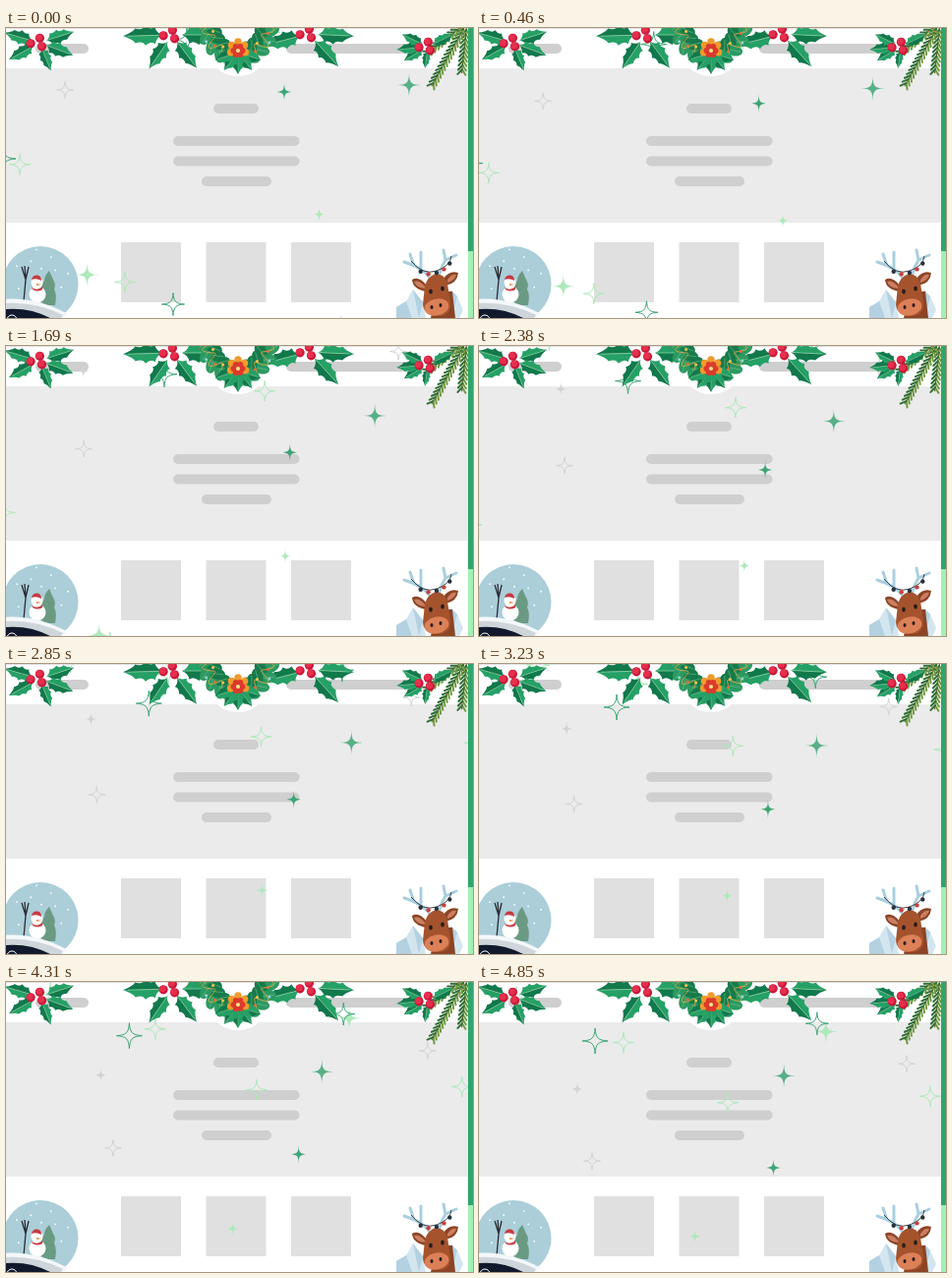
An HTML page that plays this animation: 475 by 295 pixels, repeating every 4.92 s.

```html
<!DOCTYPE html>
<html lang="en">
<head>
<meta charset="utf-8">
<title>Festive page</title>
<style>
  html, body { margin: 0; width: 100%; height: 100%; overflow: hidden; background: #fff; }
  svg { display: block; width: 475px; height: 295px; }
</style>
</head>
<body>
<svg id="stage" viewBox="0 0 475 295" xmlns="http://www.w3.org/2000/svg">
  <defs>
    <g id="leaf">
      <path fill="#25a066" d="M0 0Q5-2 6-7Q9-4 14-8Q16-4 22-6Q24-3 32 0Z"/>
      <path fill="#11794c" d="M0 0Q5 2 6 7Q9 4 14 8Q16 4 22 6Q24 3 32 0Z"/>
      <path stroke="#8fd3a4" stroke-width=".6" d="M1 0H28"/>
    </g>
    <g id="berry">
      <circle r="4.600" fill="#c9183a"/>
      <circle cx="-.8" cy="-.8" r="3.300" fill="#e62f4d"/>
    </g>
  </defs>

  <path fill="#ebebeb" d="M0 41H470V198H0Z"/>
  <path fill="#e4e4e4" d="M0 0H470V1H0Z"/>
  <g id="blocks"></g>
  <g id="stars"></g>

  <g id="globe">
    <circle cx="35" cy="260.500" r="38.500" fill="#abced9"/>
    <g id="snow"></g>
    <path fill="#6b9a83" d="M44 247Q39 252 39 257Q35 262 37 267Q34 273 36 282H50Q52 271 49 266Q51 260 48 256Z"/>
    <path fill="none" stroke="#2b2b33" stroke-width="1.300" d="M18 278L20 256L16 243M20 256L19 242M20 256L23 243"/>
    <circle cx="32" cy="271" r="8.500" fill="#fff"/>
    <circle cx="31.500" cy="259" r="6" fill="#fff"/>
    <path fill="#c73a42" d="M26 256Q27 251 32 251.500Q36 252 36 257Q31 254 26 256ZM26 264Q32 268 37 263V266Q32 269 27 266Z"/>
    <path fill="#e7873a" d="M31 260l5 1-5 1Z"/>
    <path fill="#f4f8fa" d="M-4 276Q30 273 63 291L58 295H-4Z"/>
    <path fill="#cfd6db" d="M-2 280Q30 278 58 292L56 295H-2Z"/>
    <path fill="#111a2d" d="M0 286Q24 284 45 295H0Z"/>
    <circle cx="6" cy="297" r="5" fill="none" stroke="#fff"/>
  </g>

  <g id="deer">
    <path fill="#d3e6f0" d="M397 284L407 278L414 266L424 279L427 295H397ZM446 295L453 267L459 273L465 287L461 295Z"/>
    <path fill="#b4d1e2" d="M397 284L407 278L413 295H397ZM414 266L424 279L420 295ZM453 267L459 273L453 295Z"/>
    <path fill="none" stroke="#a9cfdf" stroke-width="3" stroke-linecap="round" d="M430 253Q424 244 405 238M415 242L411 230M422 245V228M441 250Q443 242 447 236L445 226M447 236L458 231"/>
    <path id="cord" fill="none" stroke="#28333d" stroke-width=".9" d="M412 237Q424 252 438 247T453 232"/>
    <path fill="#8b4425" d="M428 262Q420 252 413 256Q414 266 428 268ZM445 255Q451 246 460 249Q459 260 447 262Z"/>
    <path fill="#cb7e62" d="M426 263Q420 256 415 258Q417 264 426 265ZM449 256Q453 250 458 251Q456 257 449 259Z"/>
    <path fill="#8b4425" d="M438 268H454L457 295H432Z"/>
    <path fill="#a4532d" d="M426 263Q428 253 437 250Q446 250 449 260L452 279Q453 293 440 293Q425 293 424 281Z"/>
    <ellipse cx="438" cy="284" rx="12.500" ry="8.500" fill="#dc8058" transform="rotate(-12 438 284)"/>
    <g fill="#251c1c">
      <ellipse cx="432" cy="268" rx="1.800" ry="2.500"/>
      <ellipse cx="444" cy="265" rx="1.800" ry="2.500"/>
      <ellipse cx="433" cy="284" rx="1.500" ry="2"/>
      <ellipse cx="442" cy="282" rx="1.500" ry="2"/>
    </g>
  </g>

  <g id="pine" stroke-linecap="round"></g>
  <g id="holly"></g>
  <g id="wreath"></g>

  <path fill="#2ea66d" d="M470 0H475V295H470Z"/>
  <path fill="#a2f0b4" d="M470 227H475V295H470Z"/>
</svg>
<script>
const byId = id => document.getElementById(id);
const rad = deg => deg * Math.PI / 180;

function add(parent, tag, attrs) {
  const el = document.createElementNS("http://www.w3.org/2000/svg", tag);
  for (const key in attrs) el.setAttribute(key, attrs[key]);
  return parent.appendChild(el);
}

const dot = (parent, cx, cy, r, fill) => add(parent, "circle", { cx, cy, r, fill });

// Point on an ellipse, angle in degrees
const around = (x, y, deg, rx, ry = rx) =>
  [x + rx * Math.cos(rad(deg)), y + ry * Math.sin(rad(deg))];

function block(x, y, width, height, rx, fill) {
  add(byId("blocks"), "rect", { x, y, width, height, rx, fill });
}

function bar(x, y, width) {
  block(x, y, width, 10, 5, "#cfcfcf");
}

function drawLayout() {
  bar(30, 16, 54);
  bar(285, 16, 130);
  bar(211, 77, 46);
  bar(170, 110, 128.5);
  bar(170, 130.5, 128.5);
  bar(199, 151, 71);
  for (let i = 0; i < 3; i++) block(117 + 86.5 * i, 218, 61, 61, 0, "#e0e0e0");
}

function drawSnow() {
  for (let i = 0; i < 16; i++)
    dot(byId("snow"), ...around(35, 256, i * 137.5, 8 * Math.sqrt(i)), 0.9, "#fff");
}

function drawBaubles() {
  const cord = byId("cord"), length = cord.getTotalLength();
  for (let i = 0; i < 5; i++) {
    const p = cord.getPointAtLength(length * (0.25 + 0.16 * i));
    dot(byId("deer"), p.x, p.y + 2, 2.2, i % 2 ? "#c9403c" : "#2a333c");
  }
}

// A holly leaf from its stem to its tip
function leaf(parent, [x, y], [tipX, tipY], wide = 1) {
  const dx = tipX - x, dy = tipY - y, size = Math.hypot(dx, dy) / 32;
  const turn = Math.atan2(dy, dx) * 180 / Math.PI;
  add(parent, "use", {
    href: "#leaf",
    transform: `translate(${x} ${y}) rotate(${turn}) scale(${size} ${size * wide})`
  });
}

function sprig(x, y, rx, ry, angles) {
  const g = byId("holly");
  for (const a of angles)
    leaf(g, around(x, y, a, rx * 0.2, ry * 0.2), around(x, y, a, rx, ry));
  for (let i = 0; i < 3; i++) {
    const [bx, by] = around(x - 2, y, i * 120 + 50, 7, 5);
    add(g, "use", { href: "#berry", x: bx, y: by });
  }
}

function drawHolly() {
  sprig(34, 15, 38, 30, [-22, 25, 72, 145, 200]);
  sprig(169, 7, 50, 39, [0, 60, 118, 178]);
  sprig(308, 6, 46, 44, [3, 49, 165]);
  sprig(429, 19, 32, 22, [-35, 95, 140, 172, 215]);
}

// Twigs fanned from the corner, needles on both sides
function drawPine() {
  const g = byId("pine");
  const line = (x, y, dir, length, stroke, width) => {
    const [x2, y2] = around(x, y, dir, length);
    add(g, "path", { d: `M${x} ${y}L${x2} ${y2}`, stroke, "stroke-width": width });
  };
  for (let i = 0; i < 3; i++) {
    const dir = 96 + 23 * i, length = 52 + 22 * Math.sin(i * Math.PI / 2);
    line(469, -6, dir, length, "#85622f", 1.2);
    for (let d = 8; d < length; d += 4.5)
      for (const side of [-1, 1])
        line(...around(469, -6, dir, d), dir + side * 38, 6.5,
          side > 0 ? "#2f6f38" : "#6f9a3f", 2);
  }
}

function drawWreath() {
  const g = byId("wreath");
  add(g, "ellipse", { cx: 236, cy: 29, rx: 26, ry: 20, fill: "#fff" });
  for (let i = 0; i < 22; i++) {
    const a = i * 9.5 - 10, odd = i % 2;
    const [x, y] = around(236, -2, a, odd ? 25 : 34);
    const transform = `translate(${x} ${y}) rotate(${a + (odd ? 35 : -35)})`;
    add(g, "ellipse", { rx: 9, ry: 5.5, fill: odd ? "#177a4a" : "#2c9961", transform });
    add(g, "path", { d: "M-7 0H7", stroke: "#75c795", "stroke-width": 0.5, transform });
  }
  const wave = [];
  for (let a = 0; a <= 180; a += 3)
    wave.push(around(236, -2, a, 31 + 6 * Math.sin(a * 0.23)));
  add(g, "polyline", { points: wave.join(" "), fill: "none", stroke: "#e5ad49", "stroke-width": 0.8 });
  for (let i = 0; i < 14; i++)
    dot(g, ...around(236, -2, i * 14, 26 + i % 3 * 5), 1.5,
      ["#f4c34e", "#e86e3b", "#92d7d4"][i % 3]);
  for (let a = 20; a <= 160; a += 35)
    leaf(g, [236, 25], around(236, 25, a, 25, 22), 1.2);
  for (let a = 160; a <= 380; a += 55)
    dot(g, ...around(236, 22, a, 8), 3.7, "#f09a2d");
  for (let a = 0; a < 360; a += 60)
    dot(g, ...around(236, 23, a, 4.5), 3, "#dc3a2c");
  dot(g, 236, 23, 2, "#ffe08a");
}

const DEEP = "#3fa576", LIGHT = "#ade9bb", GRAY = "#d3d3d3";
const movers = [];

// Stars that share a look and a drift in px/s
function flock(color, r, outlined, [vx, vy], ...spots) {
  const near = r * (outlined ? 0.06 : 0.01), far = r * (outlined ? 0.22 : 0.14);
  const d = `M0 ${-r}C${near} ${-far} ${far} ${-near} ${r} 0` +
    `C${far} ${near} ${near} ${far} 0 ${r}` +
    `C${-near} ${far} ${-far} ${near} ${-r} 0` +
    `C${-far} ${-near} ${-near} ${-far} 0 ${-r}Z`;
  for (const [x, y] of spots) {
    const el = add(byId("stars"), "path", {
      d,
      fill: outlined ? "none" : color,
      stroke: outlined ? color : "none"
    });
    movers.push(t => el.setAttribute("transform", `translate(${x + vx * t} ${y + vy * t})`));
  }
}

function drawStars() {
  flock("#58b088", 13.5, false, [-20.6, 7.74], [410, 58]);
  flock(DEEP, 10, false, [3.4, 25.6], [283, 65]);
  flock(LIGHT, 8, false, [-20.4, 14.3], [318.5, 189.5]);
  flock(LIGHT, 14, false, [7.2, 25.5], [82.5, 251], [318, -73]);
  flock(GRAY, 8.5, false, [6.75, 26.5], [67.3, -19.5], [341, 298]);
  flock(GRAY, 8.5, true, [11.35, 24.6], [60, 63], [380, -36]);
  flock(DEEP, 11.5, true, [1, 18], [170, 281], [339, -45]);
  flock(DEEP, 13, true, [-13.6, 9.9], [184, 12], [-3, 133]);
  flock(LIGHT, 12, true, [-13.6, 9.9], [104, -31]);
  flock(LIGHT, 10.5, true, [-9, 18], [14, 139], [502.5, 29]);
  flock(LIGHT, 10.5, true, [-9, 25.5], [121, 258.5], [190.6, -62]);
  flock(LIGHT, 10.5, true, [-3.15, 24.4], [268.5, 4.5]);
}

drawLayout();
drawSnow();
drawBaubles();
drawPine();
drawHolly();
drawWreath();
drawStars();

const LOOP = 4920, FPS = 13;

function draw() {
  const ms = performance.now() % LOOP;
  // Steps begin on whole hundredths of a second
  const step = Math.floor((Math.floor(ms / 10) * 10 + 5) * FPS / 1000);
  for (const move of movers) move(step / FPS);
  requestAnimationFrame(draw);
}
draw();
</script>
</body>
</html>
```
